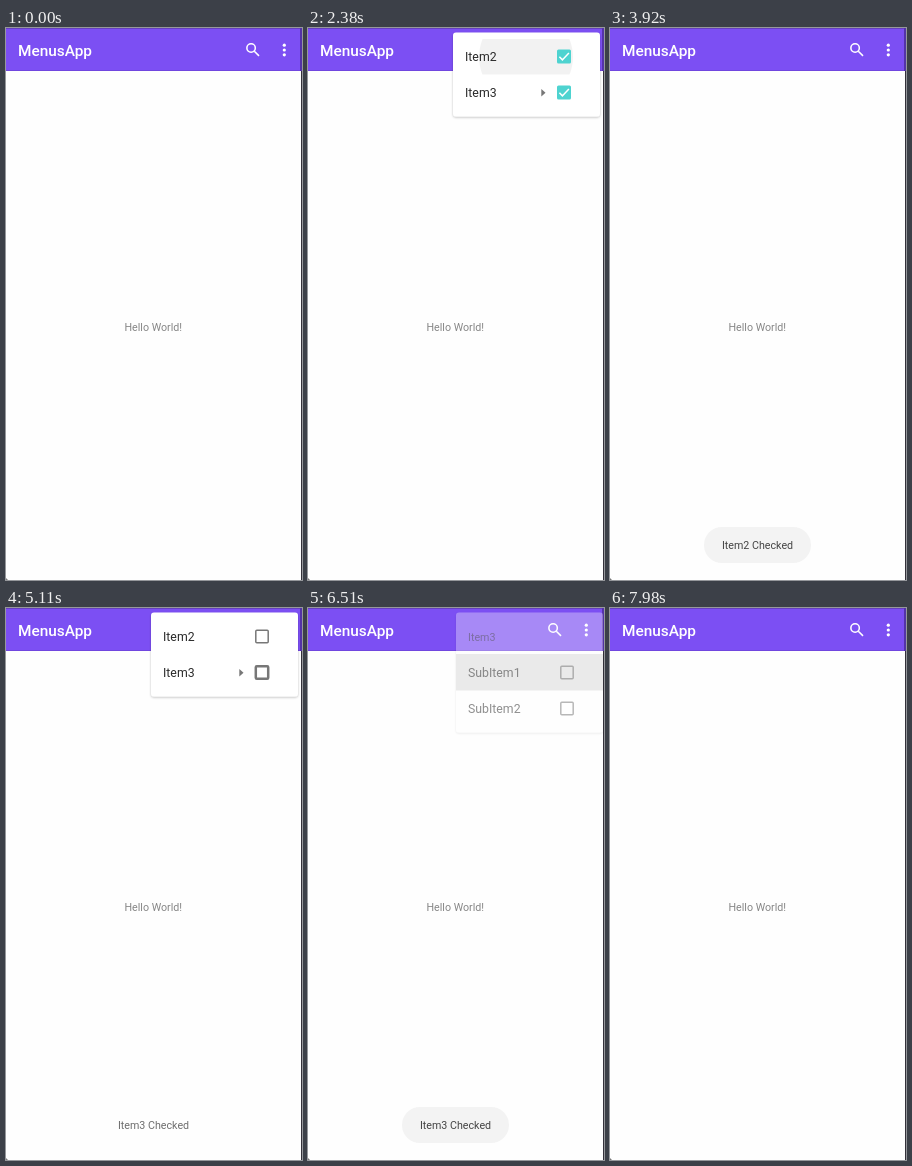
Write an HTML page that moves like this. It is 296x552 px and loops after 8000 ms.

```html
<!DOCTYPE html>
<html lang="en">
<head>
<meta charset="utf-8">
<title>Menus</title>
<style>
  html, body { margin: 0; width: 100%; height: 100%; overflow: hidden; background: #fefefe; }
  svg { display: block; width: 296px; height: 552px; }
  text { font-family: Roboto, "Open Sans", sans-serif; }
  .item { font-size: 12.3px; fill: #2b2b2b; }
  .small { font-size: 10.7px; }
  .mid { text-anchor: middle; }
</style>
</head>
<body>
<svg viewBox="0 0 296 552" xmlns="http://www.w3.org/2000/svg">
  <defs>
    <filter id="shadow" x="-10%" y="-10%" width="120%" height="125%">
      <feDropShadow dx="0" dy="1" stdDeviation="1.3" flood-color="#000" flood-opacity=".25"/>
    </filter>
    <clipPath id="bar"><rect width="295" height="43"/></clipPath>
    <clipPath id="row2"><rect x="145" y="11" width="147" height="35.5"/></clipPath>
    <clipPath id="row3"><rect x="145" y="46.5" width="147" height="36"/></clipPath>
    <clipPath id="rowSub"><rect x="148" y="46" width="147" height="36.5"/></clipPath>
  </defs>

  <rect width="296" height="552" fill="#fefefe"/>
  <rect width="296" height="43" fill="#7c4ff3"/>
  <rect width="296" height="1" fill="#6540bd"/>
  <rect y="42" width="296" height="1" fill="#7046df"/>
  <rect x="294" width="2" height="43" fill="#5433a8"/>
  <rect x="295" y="43" width="1" height="509" fill="#33313a"/>
  <path d="M0 550l2 2H0z" fill="#777"/>
  <circle id="tap" cx="278" cy="22" r="18" fill="#fff" clip-path="url(#bar)"/>
  <text x="12" y="28" font-size="15.4" font-weight="500" fill="#fff">MenusApp</text>
  <g transform="translate(237.8 12.7) scale(.768)" fill="none" stroke="#fff" stroke-width="2">
    <circle cx="9.5" cy="9.5" r="5.5"/>
    <path d="M13.7 13.7L19.8 19.8"/>
  </g>
  <g fill="#fff">
    <circle cx="278.3" cy="17.2" r="1.6"/>
    <circle cx="278.3" cy="22" r="1.6"/>
    <circle cx="278.3" cy="26.8" r="1.6"/>
  </g>
  <text class="small mid" x="147.3" y="302.5" fill="#868686">Hello World!</text>

  <rect id="pill" x="94" y="499" width="107" height="36" rx="18" fill="#f3f3f3"/>
  <text id="toast" class="small mid" x="147.5" y="521" fill="#444"></text>

  <g id="menu">
    <rect id="menuPanel" x="145" y="4.5" width="147" height="84" rx="3" fill="#fff" filter="url(#shadow)"/>
    <g clip-path="url(#row2)"><circle id="ripple2" cx="218" cy="29"/></g>
    <g clip-path="url(#row3)"><circle id="ripple3" cx="218" cy="65"/></g>
    <g id="menuBody">
      <text class="item" x="157" y="33">Item2</text>
      <text class="item" x="157" y="69">Item3</text>
      <path d="M233.3 61l4.2 3.7-4.2 3.7z" fill="#777"/>
      <g id="box2" transform="translate(256 28.5)"></g>
      <g id="box3" transform="translate(256 64.5)"></g>
    </g>
  </g>

  <g id="sub">
    <rect id="subPanel" x="148" y="4.5" width="147" height="120" rx="3" fill="#fff" filter="url(#shadow)"/>
    <g clip-path="url(#rowSub)"><circle id="rippleSub" cx="222" cy="65"/></g>
    <g id="subBody">
      <text class="small" x="160" y="32.5" fill="#555">Item3</text>
      <text class="item" x="160" y="69">SubItem1</text>
      <text class="item" x="160" y="105">SubItem2</text>
      <g id="boxA" transform="translate(259 64.5)"></g>
      <g id="boxB" transform="translate(259 100.5)"></g>
    </g>
  </g>
</svg>
<script>
const LOOP = 8000, STEP = 70;
const $ = id => document.getElementById(id);
const ramp = (t, a, b) => Math.min(1, Math.max(0, (t - a) / (b - a)));
const fade = (t, a, b, c, d) => ramp(t, a, b) * (1 - ramp(t, c, d));
const set = (id, attrs) => {
  for (const k in attrs) $(id).setAttribute(k, attrs[k]);
};

for (const id of ["box2", "box3", "boxA", "boxB"]) {
  $(id).innerHTML = `<rect class="edge" x="-6.2" y="-6.2" width="12.4" height="12.4" rx="1" fill="none" stroke="#777" stroke-width="1.5"/>
    <g class="on"><rect x="-7" y="-7" width="14" height="14" rx="1.5" fill="#4ed3d0"/>
    <path d="M-4.6 .2L-1.6 3.3 4.9-3.4" fill="none" stroke="#fff" stroke-width="1.5"/></g>`;
}

function drawBox(id, checked, bold) {
  const edge = $(id).querySelector(".edge");
  edge.style.strokeWidth = bold ? 2.5 : 1.5;
  edge.style.display = checked ? "none" : "";
  $(id).querySelector(".on").style.display = checked ? "" : "none";
}

// The panel fades faster than its labels.
function drawPopup(id, alpha) {
  $(id).style.display = alpha > 0 ? "" : "none";
  set(id + "Panel", { opacity: alpha ** 1.7 });
  set(id + "Body", { opacity: alpha });
}

function drawRipple(id, t, start, strength, alpha) {
  set(id, {
    r: 47 + 70 * ramp(t, start, start + 180),
    opacity: t >= start ? strength * alpha : 0
  });
}

function draw(t) {
  const pulse = start => Math.sin(Math.PI * ramp(t, start, start + 290));
  set("tap", { opacity: .18 * (pulse(1090) + pulse(3620)) });

  const menu = fade(t, 1400, 1620, 2590, 2880) + fade(t, 3925, 3990, 5200, 5340);
  const sub = fade(t, 5250, 5530, 6400, 6630);
  drawPopup("menu", menu);
  drawPopup("sub", sub);

  drawBox("box2", t < 2590, t < 3200);
  drawBox("box3", t < 5040, true);
  drawBox("boxA", false, false);
  drawBox("boxB", false, false);

  drawRipple("ripple2", t, 2380, .05, 1 - ramp(t, 2520, 2750));
  drawRipple("ripple3", t, 4410, .05, 1 - ramp(t, 4690, 4970));
  drawRipple("rippleSub", t, 6230, .08, Math.min(1, sub * 2));

  const second = t >= 4980;
  const [start, end] = second ? [4990, 7120] : [2680, 4760];
  $("toast").textContent = second ? "Item3 Checked" : "Item2 Checked";
  set("toast", { opacity: fade(t, start, start + 155, end, end + 230) });
  set("pill", { opacity: fade(t, start + 130, start + 280, end, end + 230) });
}

function tick(now) {
  draw(Math.floor(now % LOOP / STEP) * STEP);
  requestAnimationFrame(tick);
}
draw(0);
requestAnimationFrame(tick);
</script>
</body>
</html>
```
